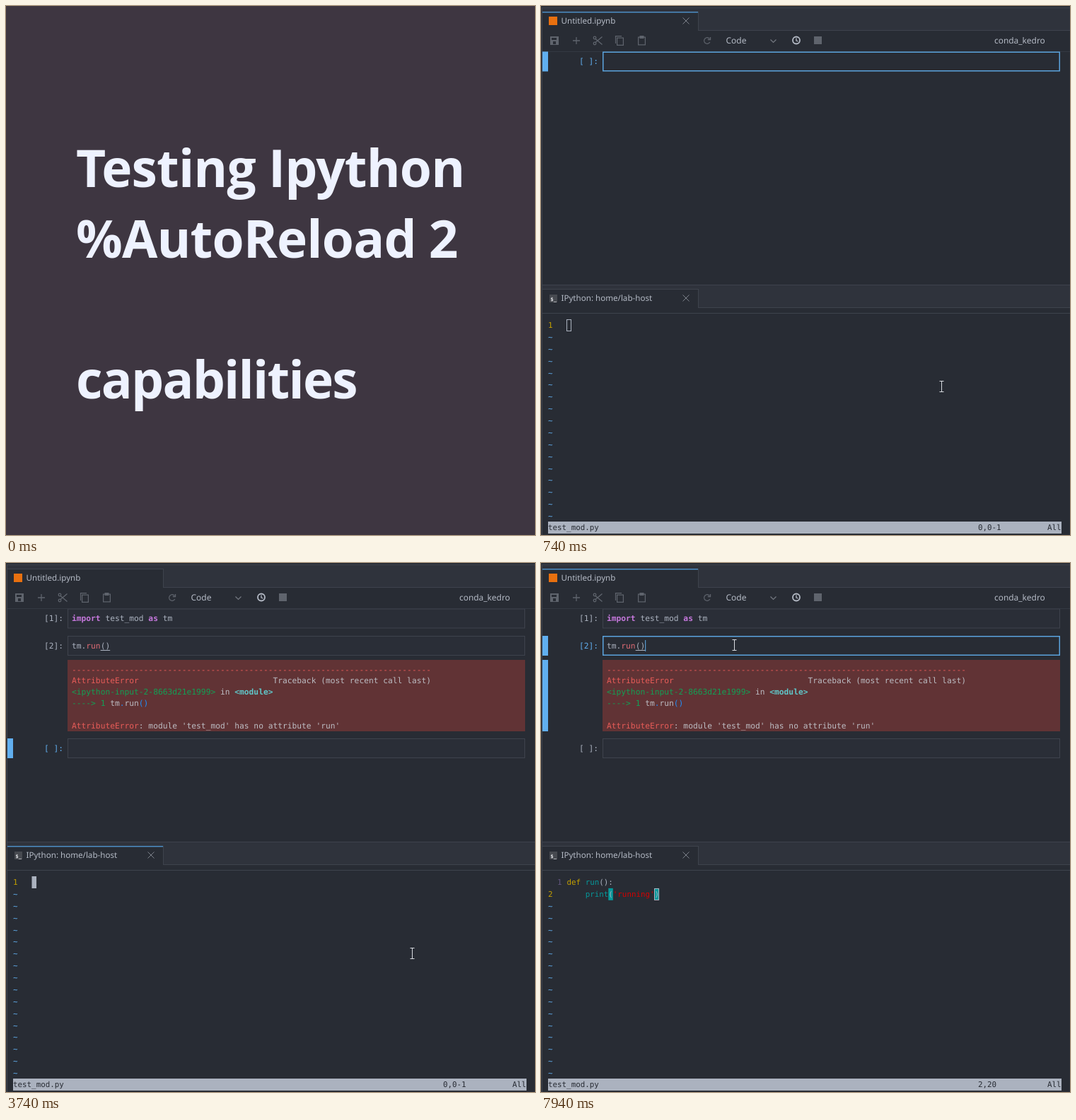
Animation of 748x748 px, one loop 8000 ms. Source, as an HTML page with a canvas:

```html
<!DOCTYPE html>
<html lang="en">
<head>
<meta charset="utf-8">
<title>Autoreload demo</title>
<style>
html, body { margin: 0; width: 100%; height: 100%; overflow: hidden; background: #3e3641; }
canvas { display: block; }
</style>
</head>
<body>
<canvas id="stage" width="748" height="748"></canvas>
<script>
const SIZE = 748, LOOP = 8000;
const BG = '#282c34', BAR = '#2f333c', LINE = '#3e434d', GREY = '#abb2bf', DIM = '#5f646d';
const BLUE = '#61afef', PURPLE = '#c678dd', ROSE = '#e06c75', TEAL = '#06989a', GOLD = '#c4a000';
const MONO = '"DejaVu Sans Mono", monospace', SANS = '"Noto Sans", sans-serif';
const CODE = 11.25, TERM = 10.85, ADV = 0.602;
const CW = CODE * ADV, TW = TERM * ADV;

const stage = document.getElementById('stage').getContext('2d');
const layer = document.createElement('canvas');
layer.width = layer.height = SIZE;
const g = layer.getContext('2d');

// token: [text, colour, keyword, bold]; keywords are coloured once complete
const IMPORT = [['import', PURPLE, 1, 1], [' test_mod ', GREY], ['as', PURPLE, 1, 1], [' tm', GREY]];
const CALL = [['tm.', GREY], ['run', ROSE], ['()', GREY]];
const DEF = [['def', GOLD, 1], [' ', GREY], ['run', TEAL], ['():', GREY]];
const PRINT = [['print', TEAL, 1], ['(', GREY], ["'running'", '#d40000'], [')', GREY]];
const RED = '#e75c58', GREEN = '#12a055', AZURE = '#208ffb', LIGHT = '#bcbcc2';
const TRACE = [
  [['-'.repeat(75), RED]],
  [['AttributeError', RED], [' '.repeat(28) + 'Traceback (most recent call last)', LIGHT]],
  [['<ipython-input-2-8663d21e1999>', GREEN], [' in ', LIGHT], ['<module>', '#60c6c8', 0, 1]],
  [['----> 1 ', GREEN], ['tm', LIGHT], ['.', AZURE], ['run', LIGHT], ['()', AZURE]],
  [],
  [['AttributeError', RED], [": module 'test_mod' has no attribute 'run'", LIGHT]]
];

// value of a list that advances every 100 ms
const step = (t, start, list) => list[Math.max(0, Math.min(list.length - 1, Math.floor((t - start) / 100)))];

function box(x, y, w, h, color) {
  g.fillStyle = color;
  g.fillRect(x, y, w, h);
}

function frame(x, y, w, h, color, width = 1) {
  g.strokeStyle = color;
  g.lineWidth = width;
  g.strokeRect(x + width / 2, y + width / 2, w - width, h - width);
}

function path(color, width, ...lines) {
  g.strokeStyle = color;
  g.lineWidth = width;
  g.beginPath();
  for (const p of lines)
    for (let i = 0; i < p.length; i += 2) i ? g.lineTo(p[i], p[i + 1]) : g.moveTo(p[i], p[i + 1]);
  g.stroke();
}

function ring(x, y, r, color, width, from = 0, to = 7) {
  g.strokeStyle = color;
  g.lineWidth = width;
  g.beginPath();
  g.arc(x, y, r, from, to);
  g.stroke();
}

function label(text, x, y, size, color, family = SANS, weight = 400) {
  g.font = `${weight} ${size}px ${family}`;
  g.fillStyle = color;
  g.fillText(text, x, y);
}

function tokens(list, x, y, size, count = 999) {
  for (const [text, color, keyword, bold] of list) {
    const part = text.slice(0, Math.max(0, count));
    const full = part === text || !keyword;
    label(part, x, y, size, full ? color : GREY, MONO, full && bold ? 700 : 400);
    x += text.length * size * ADV;
    count -= text.length;
  }
}

function cross(x, y) {
  path('#7d828b', 1, [x - 4.5, y - 4.5, x + 4.5, y + 4.5], [x + 4.5, y - 4.5, x - 4.5, y + 4.5]);
}

function tabBar(y, text, active) {
  box(0, y - 6, SIZE, 33, BAR);
  box(0, y - 6, SIZE, 1, LINE);
  box(1, y + 26, SIZE, 1, LINE);
  box(2, y, 220, 27, BG);
  box(222, y, 1, 27, LINE);
  box(2, y, 220, active ? 1.5 : 1, active ? '#4d8dc4' : LINE);
  label(text, 28.5, y + 17, 11.6, '#b4bac5');
}

function toolbar() {
  // save, add
  box(13, 43, 12, 12, DIM);
  box(15, 45, 7, 3, BG);
  box(17, 50, 4, 4, BG);
  path(DIM, 1.3, [45, 49, 55, 49], [50, 44, 50, 54]);
  // scissors
  path(DIM, 1.4, [77, 46.5, 86.5, 54.5], [77, 51.5, 86.5, 43.5]);
  ring(76, 45, 1.8, DIM, 1.3);
  ring(76, 53, 1.8, DIM, 1.3);
  // copy, paste
  frame(107, 44.5, 10, 11.5, DIM, 1.2);
  path(DIM, 1.2, [105.5, 53, 105.5, 42.6, 114, 42.6]);
  frame(137, 43.5, 11, 12, DIM, 1.2);
  box(139.5, 42, 6, 4, DIM);
  // refresh
  ring(235, 49, 4.3, DIM, 1.3, 0.5, 5.6);
  path(DIM, 1.3, [239.5, 44, 239.5, 47.5, 235.8, 47.5]);
  label('Code', 261.5, 53, 12, '#b4bac5', SANS, 500);
  path('#747982', 1.2, [324.5, 47.5, 328.5, 51.5, 332.5, 47.5]);
  // clock
  ring(361, 48.5, 5, '#b4bac5', 1.8);
  path('#b4bac5', 1.3, [361, 45.5, 361, 49, 363.5, 50]);
  box(386, 43, 11, 11, DIM);
  label('conda_kedro', 641, 53, 11.9, '#b4bac5');
}

function cell(y, prompt, selected, editing) {
  if (selected) box(2, y, 8, 28, BLUE);
  label(prompt, 54, y + 17.5, CODE, selected ? BLUE : GREY, MONO);
  box(87, y, 647, 28, editing ? BG : '#2a2e37');
  frame(87, y, 647, 28, editing ? '#5ba3dd' : LINE, editing ? 1.5 : 1);
}

function caret(col, y) {
  box(93 + col * CW, y + 6, 1, 16, BLUE);
}

function notebook(t) {
  const back = t >= 7740;
  tabBar(8, 'Untitled.ipynb', t < 3740 || back);
  box(11, 15, 12, 12, '#e8700f');
  if (t < 1140) cross(205, 21);
  toolbar();
  box(2, 64, 746, 1, '#343943');

  const ran1 = t >= 2540, ran2 = t >= 3340, failed = t >= 3440;
  cell(64.5, ran1 ? '[1]:' : '[ ]:', !ran1, !ran1);
  const n = t < 1140 ? 0 : step(t, 1140, [2, 4, 5, 7, 9, 11, 12, 14, 15, 16, 17, 18, 20, 21]);
  tokens(IMPORT, 93, 82, CODE, n);
  if (!ran1 && n) caret(n, 65);
  if (!ran1) return;

  const edit2 = !ran2 || back;
  cell(103, t >= 3540 ? '[2]:' : ran2 ? '[*]:' : '[ ]:', edit2, edit2);
  const m = t < 2640 ? 0 : step(t, 2640, [1, 3, 5, 6, 8, 8]);
  tokens(CALL, 93, 121, CODE, m);
  if (m === 8) box(93 + 6 * CW, 123, 2 * CW, 1, GREY);
  if (edit2) caret(t >= 3040 && t < 3140 ? 7 : m, 103);
  if (!ran2) return;

  if (failed) {
    box(87, 137, 647, 101, '#613335');
    TRACE.forEach((row, i) => tokens(row, 93, 154.5 + i * 15.9, CODE));
    if (back) box(2, 137, 8, 101, BLUE);
  }
  cell(failed ? 248 : 142, '[ ]:', !back, t < 3740);
}

function terminal(t) {
  const focus = t >= 3740 && t < 7740;
  tabBar(400, 'IPython: home/lab-host', focus);
  box(12, 408, 11, 11, '#474a50');
  label('$_', 13.5, 416.5, 7, '#e4e6ea', MONO, 700);
  cross(205, 413);
  box(2, 434, 746, 1, LINE);

  const rowY = i => 455 + i * 16.875;
  const second = t >= 5540;
  const n = second ? 10 : t < 4640 ? 0 : step(t, 4640, [0, 2, 3, 5, 7, 7, 8, 9, 9]);
  const m = t < 5840 ? 0 : t >= 6840 ? 16 : step(t, 5840, [2, 4, 6, 7, 9, 10, 12, 14, 15]);
  const normal = t >= 6940;
  const row = second ? 1 : 0;
  const col = second ? 4 + m - (normal ? 1 : 0) : n;
  const cx = 36.5 + col * TW, cy = rowY(row) - 12;

  if (n === 9) [7, 8].forEach(c => box(36.5 + c * TW, 443, TW, 17, TEAL));
  if (m === 16) [9, 19].forEach(c => box(36.5 + c * TW, cy, TW, 17, TEAL));

  const off = [[4040, 4240], [4440, 4640], [5740, 5840], [7040, 7140], [7240, 7340]]
    .some(([a, b]) => t >= a && t < b);
  if (t < 3740 || t >= 7540) frame(Math.round(cx - 0.5), Math.round(cy), 7, 17, GREY);
  else if (!off) box(cx, cy, TW, 17, GREY);

  if (second) label('1', 10 + 2 * TW, rowY(0), TERM, '#62567f', MONO);
  label(row + 1, 10, rowY(row), TERM, GOLD, MONO);
  tokens(DEF, 36.5, rowY(0), TERM, n);
  tokens(PRINT, 36.5 + 4 * TW, rowY(1), TERM, m);
  for (let i = row + 1; i < 17; i++) label('~', 10, rowY(i), TERM, BLUE, MONO);

  box(10, 729, 726, 17, GREY);
  const dirty = n > 0 && t < 7340;
  const pos = second ? '2,' + (normal ? 20 : 5 + m) : n ? '1,' + (n + 1) : t < 4640 ? '0,0-1' : '0,1';
  label('test_mod.py' + (dirty ? ' [+]' : ''), 10, 740.5, TERM, BG, MONO);
  label(pos, 618, 740.5, TERM, BG, MONO);
  label('All', 716, 740.5, TERM, BG, MONO);
}

function pointer(t) {
  let p;
  if (t < 940) p = step(t, 640, [[562, 531], [566, 538], [570, 546]]);
  else if (t >= 3740 && t < 4040) p = step(t, 3740, [[574, 552], [571, 550], [568, 549]]);
  else if (t >= 7740) p = step(t, 7740, [[290, 121], [278, 117], [273, 116]]);
  if (!p) return;
  const [x, y] = [p[0] + 0.5, p[1]];
  path('#d8dbe0', 1, [x, y - 7, x, y + 7], [x - 3, y - 7.5, x + 3, y - 7.5], [x - 3, y + 7.5, x + 3, y + 7.5]);
}

function title() {
  stage.fillStyle = '#3e3641';
  stage.fillRect(0, 0, SIZE, SIZE);
  stage.font = '700 73px "Open Sans", "Noto Sans", sans-serif';
  stage.fillStyle = '#eef2ff';
  const line = (text, y, tracking) => {
    stage.letterSpacing = tracking + 'px';
    stage.fillText(text, 99, y);
  };
  line('Testing Ipython', 256, -0.85);
  line('%AutoReload 2', 355.5, -0.85);
  line('capabilities', 555, -1.8);
}

function draw() {
  const t = performance.now() % LOOP;
  const p = t < 500 ? 0 : Math.min(1, (5 + Math.floor((t - 500) / 20)) / 12);
  if (p < 1) title();
  if (p > 0) {
    g.textRendering = 'geometricPrecision';
    box(0, 0, SIZE, SIZE, BG);
    notebook(t);
    terminal(t);
    box(0, 2, 1, SIZE, BG);
    box(1, 2, 1, SIZE, LINE);
    pointer(t);
    stage.globalAlpha = p;
    stage.drawImage(layer, Math.round(SIZE * (1 - p)), 0);
    stage.globalAlpha = 1;
  }
  requestAnimationFrame(draw);
}
draw();
</script>
</body>
</html>
```
